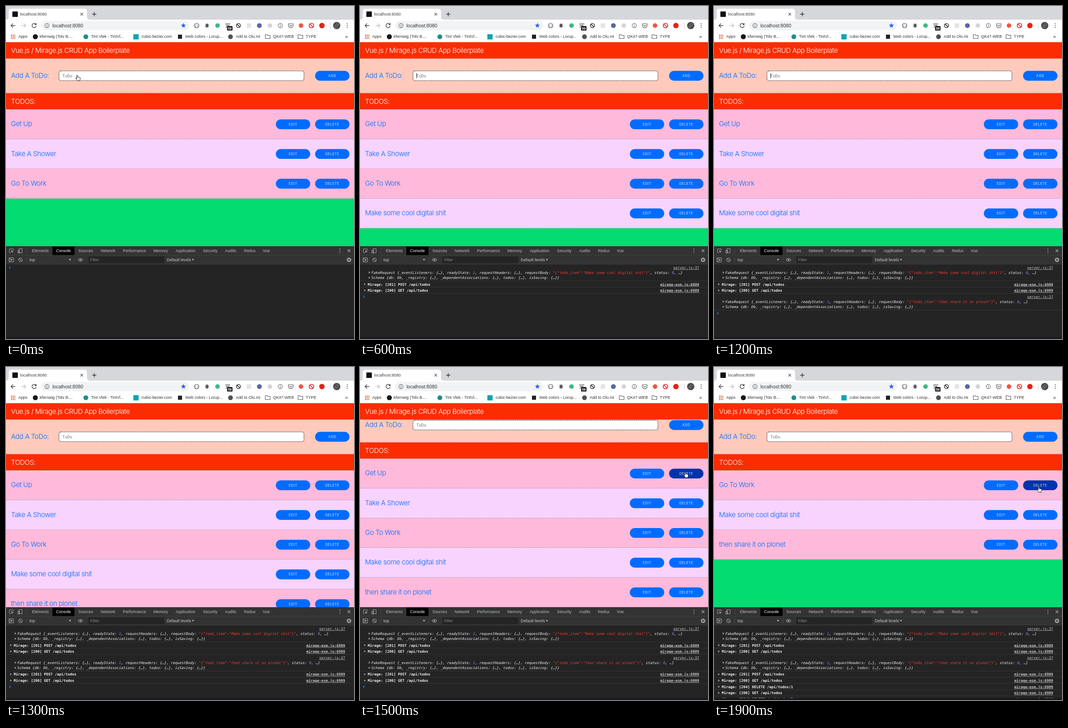
Animation, 765 px wide and 732 px high, one loop 2 s. Source, as an HTML page:

```html
<!DOCTYPE html>
<html lang="en">
<head>
<meta charset="utf-8">
<title>Todo app</title>
<style>
html, body { margin: 0; width: 100%; height: 100%; overflow: hidden; background: #242424; }
svg { display: block; }
text { font-family: "Liberation Sans", Arial, sans-serif; white-space: pre; }
.app { font: 300 15px Inter, sans-serif; letter-spacing: -.42px; }
.button { font: 7px Inter, sans-serif; letter-spacing: .75px; text-anchor: middle; }
.mono { font: 7.9px "DejaVu Sans Mono", monospace; }
.input { font: 9px "DejaVu Sans Mono", monospace; }
.bold { font-weight: bold; }
.italic { font-style: italic; }
.link { text-anchor: end; text-decoration: underline; }
</style>
</head>
<body>
<svg width="765" height="732" viewBox="0 0 765 732">
  <g id="page"></g>
  <g id="chrome"></g>
  <g id="log"></g>
  <rect y="728" width="765" height="4" fill="#1b171d"/>
  <g id="pointer"></g>
</svg>
<script>
const LOOP = 2000, STEP = 100;
const RED = '#fa2c00', BLUE = '#006cff', HOVER = '#0033a9', INK = '#5f6368';
const ROW_TOP = 227.4, ROW_HEIGHT = 65.3;
const FIRST = 'Make some cool digital shit', SECOND = 'then share it on plonet';

const layer = id => document.getElementById(id);
const rect = (x, y, w, h, fill, r = 0, extra = '') =>
  `<rect x="${x}" y="${y}" width="${w}" height="${h}" fill="${fill}" rx="${r}" ${extra}/>`;
const circle = (x, y, r, fill, extra = '') =>
  `<circle cx="${x}" cy="${y}" r="${r}" fill="${fill}" ${extra}/>`;
const ring = (x, y, r, color, width = 1.2) =>
  circle(x, y, r, 'none', `stroke="${color}" stroke-width="${width}"`);
const line = (d, color, width = 1, extra = '') =>
  `<path d="${d}" fill="none" stroke="${color}" stroke-width="${width}" ${extra}/>`;
const shape = (d, fill, extra = '') => `<path d="${d}" fill="${fill}" ${extra}/>`;
const text = (x, y, content, fill, size, cls = '') =>
  `<text x="${x}" y="${y}" fill="${fill}" class="${cls}" ${size ? `font-size="${size}"` : ''}>${content}</text>`;
const dots = (x, y, color) => [-4, 0, 4].map(d => circle(x, y + d, 1, color)).join('');
const noEntry = (x, y, r, color, width) =>
  ring(x, y, r, color, width) + line(`M${x - r * .7} ${y - r * .7}l${r * 1.4} ${r * 1.4}`, color, width);
const cross = (x, y, r, color) =>
  line(`M${x - r} ${y - r}l${2 * r} ${2 * r}m0 ${-2 * r}l${-2 * r} ${2 * r}`, color, 1.1);
const info = (x, y) => ring(x, y, 4.6, INK, 1.1) + rect(x - .6, y - .8, 1.2, 3.4, INK) + rect(x - .6, y - 2.8, 1.2, 1.2, INK);
const star = (cx, cy, r) => shape('M' + Array.from({ length: 10 }, (_, i) => {
  const angle = i * Math.PI / 5, radius = i % 2 ? r * .42 : r;
  return `${cx + radius * Math.sin(angle)} ${cy - radius * Math.cos(angle)}`;
}).join('L') + 'Z', '#2f62e8');

function browserBar() {
  const tab = rect(0, 0, 765, 30, '#d5d7db') +
    shape('M0 30Q6 30 6 24V12Q6 6 12 6H172Q178 6 178 12V24Q178 30 184 30Z', '#fff') +
    rect(14, 12, 12, 12, '#111', 1) + text(31, 21, 'localhost:8080', '#3c4043', 9.15) +
    cross(166.5, 18, 2.8, '#444') + line('M189.5 18h9M194 13.5v9', '#333', 1.4);

  const toolbar = rect(0, 30, 765, 50, '#fff') +
    line('M20.5 43H11M15.5 38.5L11 43l4.5 4.5', '#444', 1.4) +
    line('M34 43h9.5M39 38.5l4.5 4.5-4.5 4.5', '#c2c4c7', 1.4) +
    line('M65.5 40A4.6 4.6 0 1 0 66.4 44', '#444', 1.4) + shape('M67 37v4.8h-4.8z', '#444') +
    rect(77, 33, 326, 20, '#f1f3f4', 10) + info(90, 43) +
    text(102, 46.8, 'localhost:8080', '#333', 10.5) + star(390, 43, 6);

  const extensions = ring(419, 43, 5, '#555') + text(415.8, 45.5, '{ }', '#555', 7) +
    `<ellipse cx="442" cy="43" rx="2.8" ry="4.5" fill="#555"/>` +
    line('M437.5 39.5l9 7M437.5 46.5l9-7M437 43h10', '#555', .8) +
    circle(465, 43, 5, '#41b883') +
    line('M483 39.5h10M483 43h8M483 46.5h4', '#555', 1.5) + circle(483, 39.5, 1, '#e33') +
    rect(486, 44, 12, 10, '#222', 1.5) + text(488, 51.8, '59', '#fff', 7, 'bold') +
    noEntry(511, 43, 4.5, '#333', 1.6) +
    rect(529, 38, 10, 10, '#e3e5ea', 1) +
    circle(557, 43, 5.3, '#58679f') + circle(580, 43, 5, '#d4d5d7') + info(603, 43) +
    line('M621 39h10v4a5 5 0 0 1-10 0zM623.5 42l2.5 2.5 2.5-2.5', '#555', 1.2) +
    circle(648.5, 43, 5, '#ee5741') + noEntry(671.5, 43, 5, '#dc2222', 1.7) +
    circle(694.5, 43, 6, '#e52313') + rect(712, 36, 1, 14, '#d0d2d5') +
    circle(727, 43, 8, '#4b4b4b') + line('M721 47l8-10M724 49l8-10', '#999', 1) + dots(750, 43, '#444');

  const label = (x, content) => text(x, 70.3, content, '#333', 8.9);
  const folder = x => line(`M${x} 63h4l1.5 1.5h5v7h-10.5z`, '#555', 1.1);
  const grid = Array.from({ length: 9 }, (_, i) =>
    rect(11 + i % 3 * 3.6, 63 + Math.floor(i / 3) * 3.6, 2.2, 2.2, i % 3 < 2 ? '#e34b3d' : '#d96a28')).join('');
  const bookmarks = grid + label(27, 'Apps') +
    circle(64.5, 67.5, 5.5, '#171717') + label(74, 'kfernwig (Tolv B....') +
    circle(175.5, 67.5, 5.3, '#208c8c') + label(187, 'Tint Vlek - TintVl...') +
    rect(280, 62, 11.5, 11.5, '#0ba4b5') + label(298, 'cubic-bezier.com') +
    rect(378, 63, 9, 9, '#222') + label(394, 'Web colors - Lorup...') +
    circle(493.5, 67.5, 5.2, '#4d5156') + label(505, 'Add to Olu.mi') +
    folder(570) + label(587, 'QK47-WEB') + folder(642) + label(659, 'TYPE') +
    text(745.5, 70.5, '»', '#333', 11);

  return tab + toolbar + extensions + bookmarks + rect(0, 79.5, 765, 36, RED) +
    text(11, 102.7, 'Vue.js / Mirage.js CRUD App Boilerplate', '#fff', 0, 'app');
}

function devtools() {
  const grey = '#a5a8ab';
  const tabs = [[57, 'Elements'], [110, 'Console'], [159, 'Sources'], [208, 'Network'], [257, 'Performance'],
    [324, 'Memory'], [373, 'Application'], [433, 'Security'], [481.5, 'Audits'], [523, 'Redux'], [564.5, 'Vue']];
  return rect(0, 528, 765, 204, '#242424') + rect(0, 528, 765, 39.5, '#333') +
    rect(0, 547.5, 765, .8, '#454545') + rect(0, 567, 765, .8, '#414141') +
    rect(102, 529, 48.5, 18.5, '#000') +
    tabs.map(([x, name]) => text(x, 541.3, name, name === 'Console' ? '#fff' : '#b9bcc0', 8.85)).join('') +
    line('M11 542H7.5V534H16v3', grey, 1) + shape('M11 537l6 2.5-2.5 1-1 2.5z', grey) +
    line('M28.5 533.5h7v9h-7zM26 537h4v6h-4z', grey, 1) + rect(45, 532, 1, 12, '#484848') +
    dots(734, 538, grey) + cross(754, 538, 3, grey) +
    line('M6.5 553.5h10v9h-10zM9 553.5v9', grey, 1) + shape('M11 555.5l4 2.5-4 2.5z', grey) +
    noEntry(32, 558, 4, grey, 1.1) + rect(45, 552, 1, 12, '#484848') + text(51.5, 561, 'top', '#c9cbcd', 8.85) +
    shape('M138 556h5.5l-2.75 4z', grey) + rect(151, 552, 1, 12, '#484848') +
    line('M158.5 558q5-6.5 10.5 0q-5.5 6.5-10.5 0z', grey, 1.1) + circle(163.7, 558, 1.8, grey) +
    rect(181, 550.5, 167, 15, '#242424') + text(185, 561, 'Filter', '#85888b', 8.85) +
    text(353.5, 561, 'Default levels', '#c9cbcd', 8.85) + shape('M408.5 556h5l-2.5 4z', grey) +
    ring(754, 558, 3, grey, 2) + circle(754, 558, 4.6, 'none', `stroke="${grey}" stroke-width="1.4" stroke-dasharray="1.8 1.81"`);
}

const button = (x, y, label, hovered) =>
  rect(x, y, 75.5, 21.6, hovered ? HOVER : BLUE, 10.8) + text(x + 37.9, y + 13.3, label, '#e9f3ff', 0, 'button');
const dashed = y => line(`M0 ${y}H765`, '#c95b8b', .8, 'stroke-dasharray="2.2 1.6" opacity=".8"');

function page({ todos, typed, focused, scroll, hovered }) {
  const form = rect(0, 115, 765, 77, '#ffcabb') + dashed(191.2) +
    text(11, 158.2, 'Add A ToDo:', BLUE, 0, 'app') +
    rect(116.5, 142.7, 538.5, 21.3, '#fff', 4, 'stroke="#0c1830" stroke-width="1.1" stroke-dasharray="2.2 1.6"') +
    text(124, 156.5, typed || 'ToDo', typed ? '#111' : '#757575', 0, 'input') +
    (focused ? rect(124 + typed.length * 5.42, 148, 1, 10.5, '#111') : '') +
    button(679.5, 142.6, 'ADD') +
    rect(0, 191.7, 765, 35.7, RED) + text(11, 214.7, 'TODOS:', '#fff', 0, 'app');
  const rows = todos.map((todo, i) => {
    const y = ROW_TOP + i * ROW_HEIGHT;
    return rect(0, y, 765, ROW_HEIGHT, i % 2 ? '#f8d3fe' : '#ffbadb') + dashed(y + ROW_HEIGHT - .4) +
      text(11, y + 36.8, todo, BLUE, 0, 'app') + button(593.2, y + 21.8, 'EDIT') +
      button(679.5, y + 21.8, 'DELETE', i === hovered);
  }).join('');
  return rect(0, 79, 765, 450, '#02dc71') + `<g transform="translate(0 ${-scroll})">${form}${rows}</g>`;
}

const tint = (color, content) => `<tspan fill="${color}">${content}</tspan>`;
const arrow = (x, y) => shape(`M${x} ${y - 2.5}l4 2.5-4 2.5z`, '#8f9194');

function consoleLog(entries) {
  let y = 568, out = '';
  for (const { body, call } of entries) {
    if (body) {
      const request = 'FakeRequest {_eventListeners: {…}, readyState: ' + tint('#9980ff', 1) +
        ', requestHeaders: {…}, requestBody: ' + tint('#f23c36', `"{"todo_item":"${body}"}"`) +
        ', status: ' + tint('#9980ff', 0) + ', …}';
      const schema = 'Schema {db: Db, _registry: {…}, _dependentAssociations: {…}, todos: {…}, isSaving: {…}}';
      out += text(745.5, y + 9.8, 'server.js:37', '#c8c8c8', 0, 'mono link') +
        arrow(19, y + 17.8) + text(25, y + 20.6, request, '#f2f2f2', 0, 'mono italic') +
        arrow(19, y + 29.3) + text(25, y + 32.1, schema, '#f2f2f2', 0, 'mono italic');
      y += 36.6;
    } else {
      out += arrow(9, y + 7) + text(17, y + 9.9, 'Mirage: ' + call, '#f2f2f2', 0, 'mono bold') +
        text(745.5, y + 9.9, 'mirage-esm.js:6909', '#c8c8c8', 0, 'mono bold link');
      y += 13.65;
    }
    out += rect(0, y - .6, 765, .8, '#393939');
  }
  return out + line(`M7 ${y + 4.5}l2.8 2.5-2.8 2.5`, '#367cf1', 1.2);
}

const hand = ([x, y]) => shape('M2 0Q3.5-.5 3.7 1.2L4 4.5Q5 3.6 5.7 4.7Q7 4 7.6 5.2Q9.2 4.8 9.3 6.3Q9.5 9 8.2 10.7V12.3H3.2L.4 8.7Q-1.6 6.8-.5 6.2Q.5 5.8 2 7.4L1.4 1.3Q1.3.3 2 0Z',
  '#fff', `stroke="#111" stroke-width="1" transform="translate(${x} ${y})"`);

const created = body => [{ body }, { call: '[201] POST /api/todos' }, { call: '[200] GET /api/todos' }];
const deleted = id => [{ call: `[204] DELETE /api/todos/${id}` }, { call: '[200] GET /api/todos' }];
const HISTORY = [...created(FIRST), ...created(SECOND), ...deleted(1), ...deleted(2)];
const TODOS = ['Get Up', 'Take A Shower', 'Go To Work', FIRST, SECOND];
const POINTERS = { 0: [154, 152], 15: [712.5, 231], 16: [714, 257], 17: [713, 259], 18: [713, 325], 19: [711, 263] };

// Each [step, value] pair holds until the next one begins.
const hold = (step, ...pairs) => pairs.reduce((value, [from, next]) => step >= from ? next : value, 0);

function typedAt(step) {
  if (step >= 1 && step <= 3) return FIRST.slice(0, step * 9);
  if (step >= 9 && step <= 11) return SECOND.slice(0, Math.round(4 + (step - 9) * 9.5));
  return '';
}

function draw(step) {
  layer('page').innerHTML = page({
    todos: TODOS.slice(hold(step, [16, 1], [17, 2]), hold(step, [0, 3], [5, 4], [13, 5])),
    typed: typedAt(step),
    focused: step >= 1 && step <= 12,
    scroll: step === 14 || step === 15 ? 25.8 : 0,
    hovered: step < 15 ? -1 : step === 18 ? 1 : 0
  });
  layer('log').innerHTML = consoleLog(HISTORY.slice(0, hold(step, [4, 1], [5, 3], [12, 4], [13, 6], [16, 8], [17, 10])));
  layer('pointer').innerHTML = POINTERS[step] ? hand(POINTERS[step]) : '';
}

layer('chrome').innerHTML = browserBar() + devtools();
let shown = -1;
function tick() {
  const step = Math.floor(performance.now() % LOOP / STEP);
  if (step !== shown) draw(shown = step);
  requestAnimationFrame(tick);
}
tick();
</script>
</body>
</html>
```
